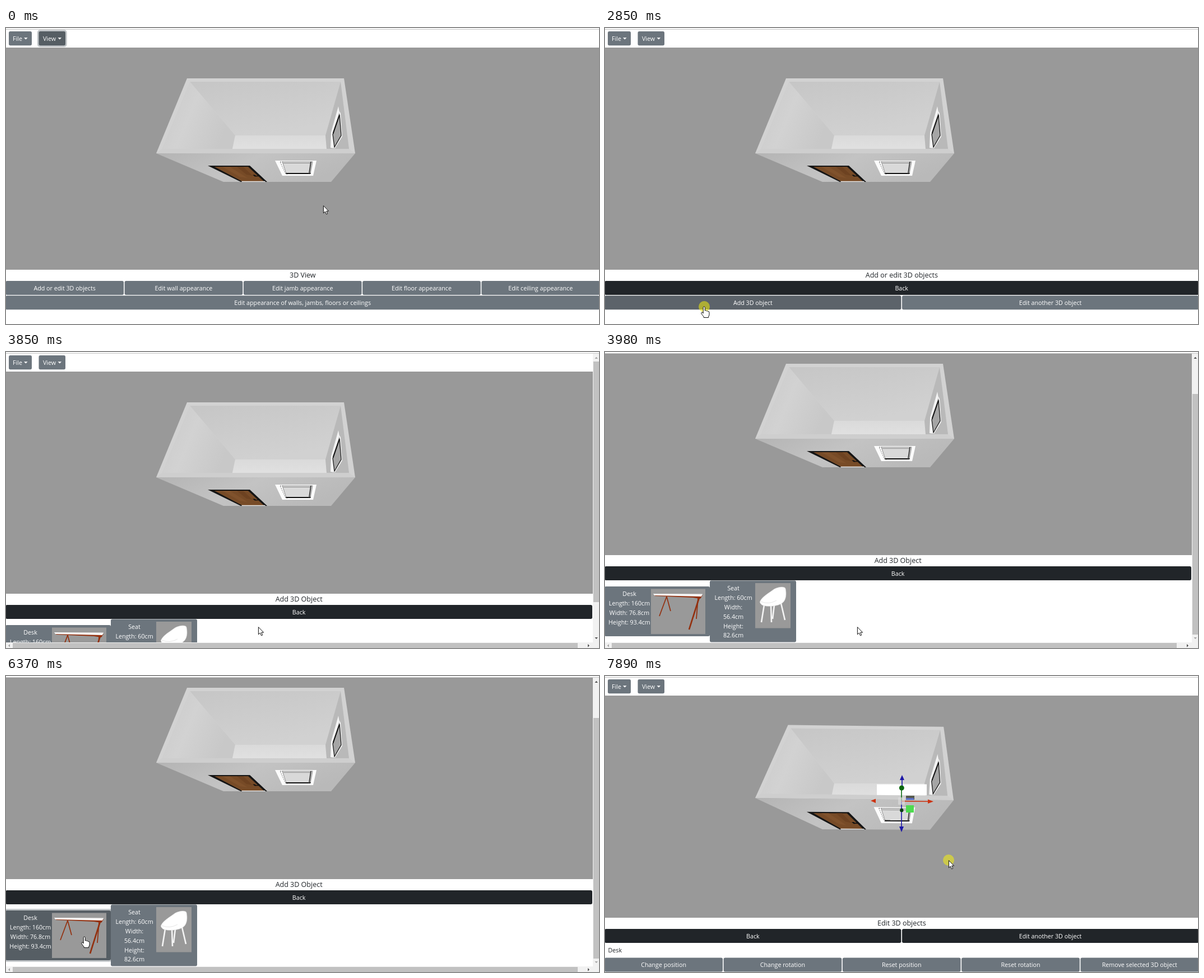
Recreate the animation shown at these times as an HTML page. Size 1058 by 529 pixels, loop 8000 ms.

```html
<!DOCTYPE html>
<html lang="en">
<head>
<meta charset="utf-8">
<title>3D room editor</title>
<style>
html, body { margin: 0; width: 100%; height: 100%; overflow: hidden; background: #fff; }
svg { display: block; width: 100%; height: 100%; }
text { font: 10.7px "Open Sans", "Noto Sans", sans-serif; fill: #fff; }
text.title { font-size: 12.5px; fill: #212529; }
text.dark { fill: #212529; }
</style>
</head>
<body>
<svg viewBox="0 0 1058 529">
  <defs>
    <linearGradient id="back" x1="0" y1="0" x2=".5" y2="1"><stop stop-color="#c6c6c6"/><stop offset="1" stop-color="#d1d1d1"/></linearGradient>
    <linearGradient id="left" x1="0" y1="0" x2="1" y2=".4"><stop stop-color="#c9c9c9"/><stop offset=".5" stop-color="#d2d2d2"/><stop offset="1" stop-color="#c8c8c8"/></linearGradient>
    <linearGradient id="front" x1="0" x2="1" y2=".3"><stop stop-color="#b4b4b4"/><stop offset=".5" stop-color="#c3c3c3"/><stop offset="1" stop-color="#b9b9b9"/></linearGradient>
    <linearGradient id="floor" x2="0" y2="1"><stop stop-color="#dadada"/><stop offset="1" stop-color="#e0e0e0"/></linearGradient>
    <clipPath id="page"><path d="M0 3H1047V519H0Z"/></clipPath>
  </defs>
  <g id="stage"></g>
</svg>
<script>
const LOOP = 8000, stage = document.getElementById('stage');
const DARK = '#212529', GREY = '#6c757d';

// time, pointer x, y, hovered button, click spot, focused button
const steps = [
  [0, 566, 317, '', 0, 'View'],
  [960, 543, 327, '', 0, 'View'],
  [1090, 425, 378, '', 0, 'View'],
  [1215, 255, 428, '', 0, 'View'],
  [1340, 140, 456, 'Add or edit 3D objects', 0, 'View'],
  [1465, 115, 461, 'Add or edit 3D objects', 1, 'View'],
  [1590, 115, 461, 'Add or edit 3D objects', 1, 'Add or edit 3D objects'],
  [1720, 115, 461, 'Back'],
  [2220, 120, 468, 'Back'],
  [2350, 148, 485, 'Add 3D object'],
  [2475, 171, 495, 'Add 3D object'],
  [2600, 177, 498, 'Add 3D object'],
  [2850, 177, 498, 'Add 3D object', 1],
  [2980, 177, 498, 'Add 3D object', 0, 'Add 3D object'],
  [3100, 177, 498, 'Desk'],
  [3350, 205, 498, 'Seat'],
  [3475, 310, 497, 'Seat'],
  [3600, 415, 494, ''],
  [3725, 445, 491, ''],
  [3850, 450, 491, ''],
  [3980, 450, 491, ''],
  [4230, 440, 489, ''],
  [4355, 390, 483, ''],
  [4480, 310, 474, 'Seat'],
  [4605, 262, 468, 'Seat'],
  [4730, 247, 466, 'Seat'],
  [5990, 172, 466, 'Seat'],
  [6130, 147, 466, 'Desk'],
  [6250, 140, 466, 'Desk', 1],
  [6370, 140, 466, 'Desk', 0, 'Desk'],
  [6480, 140, 466, 'Back'],
  [6620, 330, 458, 'Back'],
  [6740, 518, 448, ''],
  [7120, 556, 428, ''],
  [7245, 618, 396, ''],
  [7370, 672, 362, ''],
  [7495, 645, 340, ''],
  [7620, 613, 330, ''],
  [7890, 613, 329, '', 1]
];

let hot, focus, turned;

const rect = (x, y, w, h, fill, more = '') =>
  `<rect x="${x}" y="${y}" width="${w}" height="${h}" fill="${fill}" ${more}/>`;
const poly = (points, fill, more = '') => `<polygon points="${points}" fill="${fill}" ${more}/>`;
const path = (d, stroke, width = 1, fill = 'none') =>
  `<path d="${d}" fill="${fill}" stroke="${stroke}" stroke-width="${width}"/>`;
const text = (x, y, s, cls = '', anchor = 'middle') =>
  `<text x="${x}" y="${y}" class="${cls}" text-anchor="${anchor}">${s}</text>`;

// Box of a button with its hover and focus looks
function box(name, x, y, w, h, fill = GREY) {
  const ring = focus === name;
  if (fill === GREY) fill = ring ? '#565e64' : hot === name ? '#5c636a' : GREY;
  else if (hot === name) fill = '#1c1f23';
  return (ring ? rect(x - 2.7, y - 2.7, w + 5.4, h + 5.4, '#c1c5c8', 'rx="5"') : '') +
    rect(x, y, w, h, fill, 'rx="2.7"');
}
const button = (name, x, y, w, fill) =>
  box(name, x, y, w, 25, fill) + text(x + w / 2, y + 16.5, name);

function row(names, y, fill, width = 1059.8) {
  const pitch = (width + 1.6) / names.length;
  return names.map((n, i) => button(n, -.7 + i * pitch, y, pitch - 1.6, fill)).join('');
}

const menu = (name, x, w, tx, cx) => box(name, x, 6, w, 25.3) +
  text(tx, 23, name, '', 'start') + poly(`${cx},17.2 ${cx + 6.6},17.2 ${cx + 3.3},20.5`, '#fff');

// Shifts points for the slightly rotated camera
const turn = points => !turned ? points : points.replace(/(\S+),(\S+)/g, (_, x, y) => {
  const u = (x - 268) / 355;
  let dx, dy;
  if (y <= 224) {
    const v = (y - 90) / 134;
    dx = (1 - v) * (4 - 3 * u) - v * u;
    dy = (1 - v) * (4 * u - 3) + v * (4 * u - 6);
  } else {
    const k = 1 - (y - 224) / 51;
    dx = -u * k;
    dy = (4 * u - 6) * k - 1.5 * (1 - k) * (1 - u);
  }
  return `${(+x + dx).toFixed(2)},${(+y + dy).toFixed(2)}`;
});
const face = (points, fill, more) => poly(turn(points), fill, more);

function room(desk) {
  const a = turn('328,96'), b = turn('597,96'), c = turn('612,216'), d = turn('278,216');
  const line = 'stroke="#111" stroke-width="1.2"';
  return face('323,90 603,90 623,224 268,224', '#d2d2d2') +
    poly(`${a} ${b} 570,192 409,192`, 'url(#back)') +
    poly(`${a} 409,192 404,216 ${d}`, 'url(#left)') +
    poly(`409,192 570,192 572,216 404,216`, 'url(#floor)') +
    poly(`${b} ${c} 572,216 570,192`, '#b9b9b9') +
    // side window
    face('593,140 595,152 584,188 585,215 579,214 580,186', '#f4f4f4') +
    face('594,148 597,152 600,194 587,215 584,215 582,189', '#eee') +
    face('595,155 598,192 586,213 583,190', '#a5a5a5', line) +
    face('595,152 583,187 584,190 595,158', '#111') +
    (desk ? rect(485, 193.5, 89, 20, '#fff') : '') +
    face('278,216 612,216 623,224 268,224', '#cecece') +
    face('268,224 623,224 580,275 388,275', 'url(#front)') +
    // door
    face('360,246 435,246 466,275 419,275', '#151515') +
    face('372,248 432,248 460,274 421,274', '#774b27') +
    face('386,248 399,248 431,268 417,266', '#80522c') +
    face('412,248 423,248 440,264 429,262', '#6d4221') +
    face('420,273.7 462,273.7 463,275 421,275', '#eee') +
    face('440,262.5 444,262.5 446,264 452,263.5 452,265 444,265.5', '#111') +
    // front window
    face('480,237 554,237 548,264 493,264', '#fbfbfb') +
    face('489,239 494,239 502,261 499,261', 'none', 'stroke="#555" stroke-width=".8" stroke-dasharray="2 1.5"') +
    face('493,239 547,239 543,260 500,260', '#d9d9d9', 'stroke="#777" stroke-width=".8"') +
    face('494,241 544,241 543,242 495,242', '#8c8c8c') +
    face('499,259 544,259 543,261 500,261', '#111') +
    face('543,239 545,239 542,260 540,260', '#444');
}

function gizmo() {
  const blue = '#1c17a6', red = '#cc3312', green = '#08670d';
  return path('M530 186V200M529 240V272', blue, 1.6) + path('M529 203V223', green, 1.6) +
    path('M529 223V240', blue, 1.6) + path('M529 223.6L578 224.3', red, 1.6) +
    rect(523, 217, 12, 13, '#ddd', 'opacity=".65"') +
    poly('530,177 534,186 526,186', blue) + poly('525,269 533,269 529,279', blue) +
    poly('474,223 483,219.5 483,227', red) + poly('586,224.3 576,220.5 576,228', red) +
    `<circle cx="529.3" cy="200" r="4.5" fill="${green}"/><circle cx="529.3" cy="240" r="3.2" fill="#0a3d12"/>` +
    rect(537, 214, 15, 7, '#575a4d') + rect(537, 218, 14, 3.5, '#5b6cc4') +
    rect(537, 231, 14, 13, '#4edb50');
}

function card(name, x, y, w, h, tx, lines) {
  return box(name, x, y, w, h) +
    [name, ...lines].map((s, i) => text(tx, y + 17.4 + i * 16.9, s)).join('');
}

function cards() {
  const brown = '#93300f';
  return card('Desk', -1, 488, 188, 89, 43.5, ['Length: 160cm', 'Width: 76.8cm', 'Height: 93.4cm']) +
    rect(82, 492.5, 97, 80.5, '#999') +
    path('M110 506L97 541M110 506L117 532M166 509L163 546', brown, 1.7) +
    path('M168 508L150 565', brown, 2.6) +
    poly('87,503 174,504 170,510 157,508 90,505', brown) +
    poly('86,501 174,501.5 172,506 88,504', '#f7f7f7') +
    card('Seat', 187, 477.5, 154, 110, 229, ['Length: 60cm', 'Width:', '56.4cm', 'Height:', '82.6cm']) +
    rect(268, 482, 63, 80.5, '#999') +
    path('M284 521L279 552M296 522L297 552M302 521L299 546M314 518L321 548', '#f4f4f4', 2.6) +
    path('M277 514C281 506 292 500 300 494C307 489 321 487 322 492C324 502 323 512 317 517C309 524 287 525 280 521Q275 517 277 514Z', '#ddd', .6, '#fff') +
    path('M278 515Q292 521 306 513', '#ddd', .8);
}

function scrollbars(scroll) {
  const on = '#505050', off = '#a3a3a3';
  return rect(1047, 3, 11, 526, '#f1f1f1') + rect(0, 519, 1058, 10, '#f1f1f1') +
    rect(1048, scroll ? 75 : 17, 10, 430, '#c1c1c1') + rect(12, 520, 1008, 9, '#c1c1c1') +
    poly('1050.5,12 1056,12 1053.2,8.8', scroll ? on : off) +
    poly('1050.5,510 1056,510 1053.2,513', scroll ? off : on) +
    poly('7,522 7,527.5 4,524.7', off) + poly('1038,522 1038,527.5 1041,524.7', on);
}

function panel(t) {
  const title = (s, x = 529.3) => text(x, 446, s, 'title');
  if (t < 1720) return title('3D View') +
    row(['Add or edit 3D objects', 'Edit wall appearance', 'Edit jamb appearance', 'Edit floor appearance', 'Edit ceiling appearance'], 452) +
    row(['Edit appearance of walls, jambs, floors or ceilings'], 478.3);
  if (t < 3100) return title('Add or edit 3D objects') + row(['Back'], 452, DARK) +
    row(['Add 3D object', 'Edit another 3D object'], 478.3);
  if (t < 6480) return title('Add 3D Object', 522.6) + row(['Back'], 452, DARK, 1046.7) + cards();
  return title('Edit 3D objects') + row(['Back', 'Edit another 3D object'], 452, DARK) +
    text(5.5, 494.3, 'Desk', 'dark', 'start') +
    row(['Change position', 'Change rotation', 'Reset position', 'Reset rotation', 'Remove selected 3D object'], 503.5);
}

function pointer(x, y, click) {
  const spot = click ? `<circle cx="${x}" cy="${y}" r="10" fill="#fffa00" opacity=".5"/>` : '';
  const shape = hot
    ? 'M-1.8 1.5Q-1.8 0 -.3 0T1.3 1.5V7Q3.5 6 4.2 7.8Q6 7 6.8 8.6Q9 8 9 10.5V14Q9 16 7.5 18V19.5H-.8V18Q-3 15.5 -5 12.5Q-5.6 10.5 -4.2 10T-1.8 12Z'
    : 'M.4 .6V13.8L3.4 11L5.5 15.8L7.7 14.9L5.7 10.2H9.6Z';
  return `${spot}<g transform="translate(${x} ${y})">${path(shape, '#111', 1, '#fff')}</g>`;
}

function draw([t, x, y, hover, click, focused]) {
  hot = hover;
  focus = focused;
  turned = t >= 7890;
  const added = t >= 6480, bars = t >= 3100 && !added;
  const scroll = t >= 3980 && !added ? 69 : 0;
  stage.innerHTML = rect(0, 0, 1058, 529, '#fff') +
    `<g ${bars ? 'clip-path="url(#page)"' : ''}><g transform="translate(0 ${-scroll})">` +
    menu('File', 5, 41, 12, 32) + menu('View', 58.5, 47.5, 66, 92.5) +
    rect(0, 35, 1058, 397, '#999') + room(added) + (added ? gizmo() : '') + panel(t) + '</g></g>' +
    (bars ? scrollbars(scroll) : '') +
    rect(0, 0, 1058, 2, '#fafafa') + rect(0, 2, 1058, 1, '#c8c8c8') +
    pointer(x, y, click);
}

let shown;
function tick() {
  const t = performance.now() % LOOP;
  const step = steps.findLast(s => s[0] <= t);
  if (step !== shown) draw(shown = step);
  requestAnimationFrame(tick);
}
tick();
</script>
</body>
</html>
```
